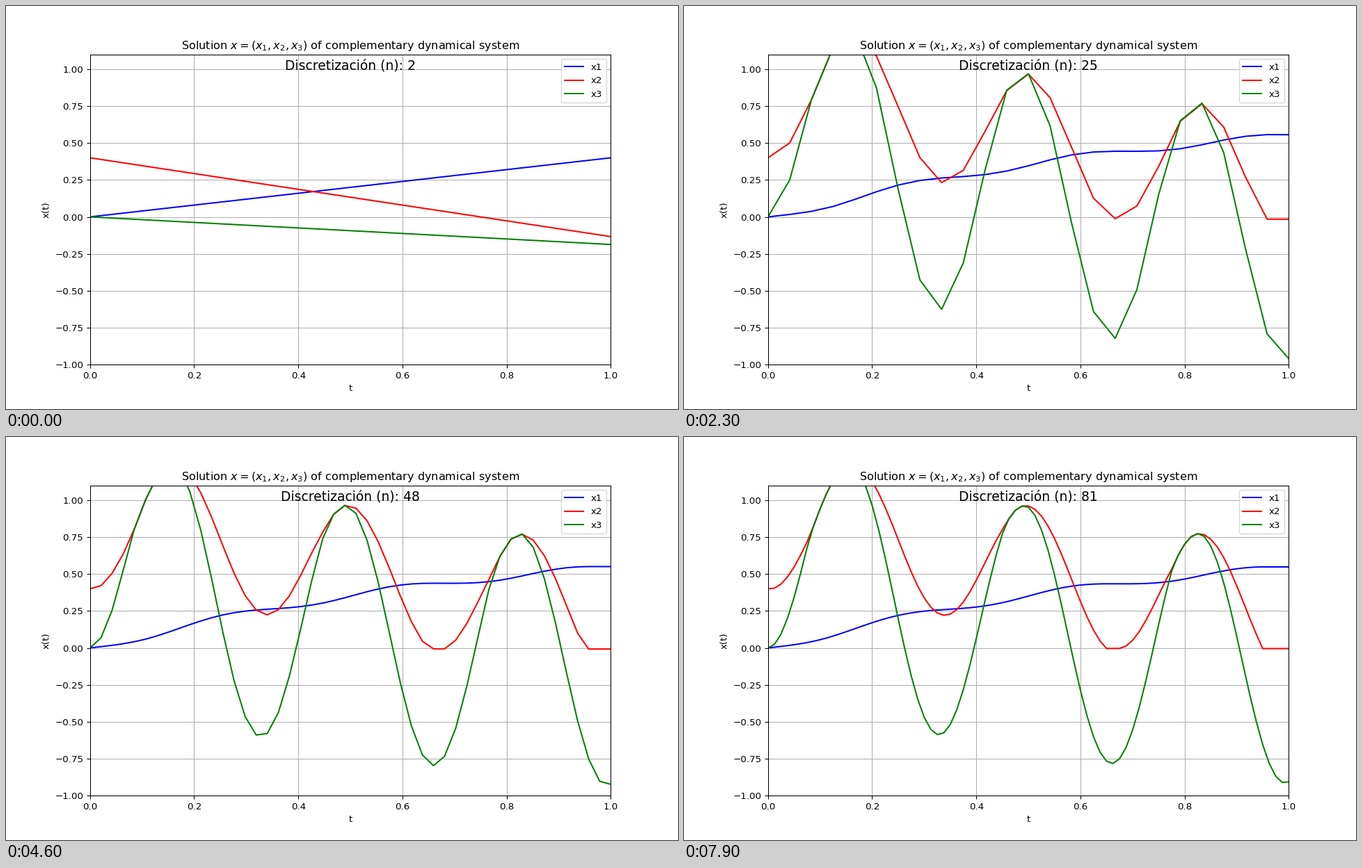
Recreate the animation shown at these times as a matplotlib script. Size 966 by 580 pixels, loop 8000 ms.

```python
import numpy as np
import matplotlib.pyplot as plt
from matplotlib.animation import FuncAnimation

OMEGA = 6 * np.pi
FRAMES = 80
DPI = 96.6


def project(x2, x3, w=0.325):
    """Weighted projection onto x2 >= 0, x2 >= x3."""
    if x2 < x3:
        y = (1 - w) * x2 + w * x3
        if y >= 0:
            return y, y
        return 0.0, min(x3, 0.0)
    return max(x2, 0.0), x3


def solve(n):
    """Catching-up scheme with n nodes on [0, 1]."""
    t = np.linspace(0, 1, n)
    h = t[1]
    x = np.zeros((n, 3))
    x[0] = 0, 0.4, 0
    for i in range(n - 1):
        x1, x2, x3 = x[i]
        # integral of sin over the step
        s = (np.cos(OMEGA * t[i]) - np.cos(OMEGA * t[i + 1])) / OMEGA
        p2 = x2 + 8 * s + h * (-1.42 * x2 + 0.78 * x3)
        p3 = x3 + 15.85 * s + h * (0.25 * x2 - 2.7 * x3)
        p2, p3 = project(p2, p3)
        new1 = x1 + h * x2
        mid1 = (x1 + new1) / 2
        x[i + 1] = new1, p2 - h * mid1 * 2 / 3, p3 - h * new1 * 7 / 15
    return t, x


# the small margin keeps the pixel size from rounding down
fig, ax = plt.subplots(figsize=(966.001 / DPI, 580.001 / DPI), dpi=DPI)
lines = [ax.plot([], [], color=c, label=name)[0]
         for c, name in (("blue", "x1"), ("red", "x2"), ("green", "x3"))]
counter = ax.text(0.5, 0.95, "", transform=ax.transAxes, ha="center", fontsize=14)
ax.set_xlim(0, 1)
ax.set_ylim(-1, 1.1)
ax.set_xlabel("t")
ax.set_ylabel("x(t)")
ax.set_title("Solution $x=(x_1,x_2,x_3)$ of complementary dynamical system")
ax.grid(True)
ax.legend(loc="upper right")


def update(frame):
    n = frame + 2
    t, x = solve(n)
    for line, values in zip(lines, x.T):
        line.set_data(t, values)
    counter.set_text(f"Discretización (n): {n}")
    return [*lines, counter]


anim = FuncAnimation(fig, update, frames=FRAMES, interval=100, repeat=True, repeat_delay=0)
plt.show()
```
